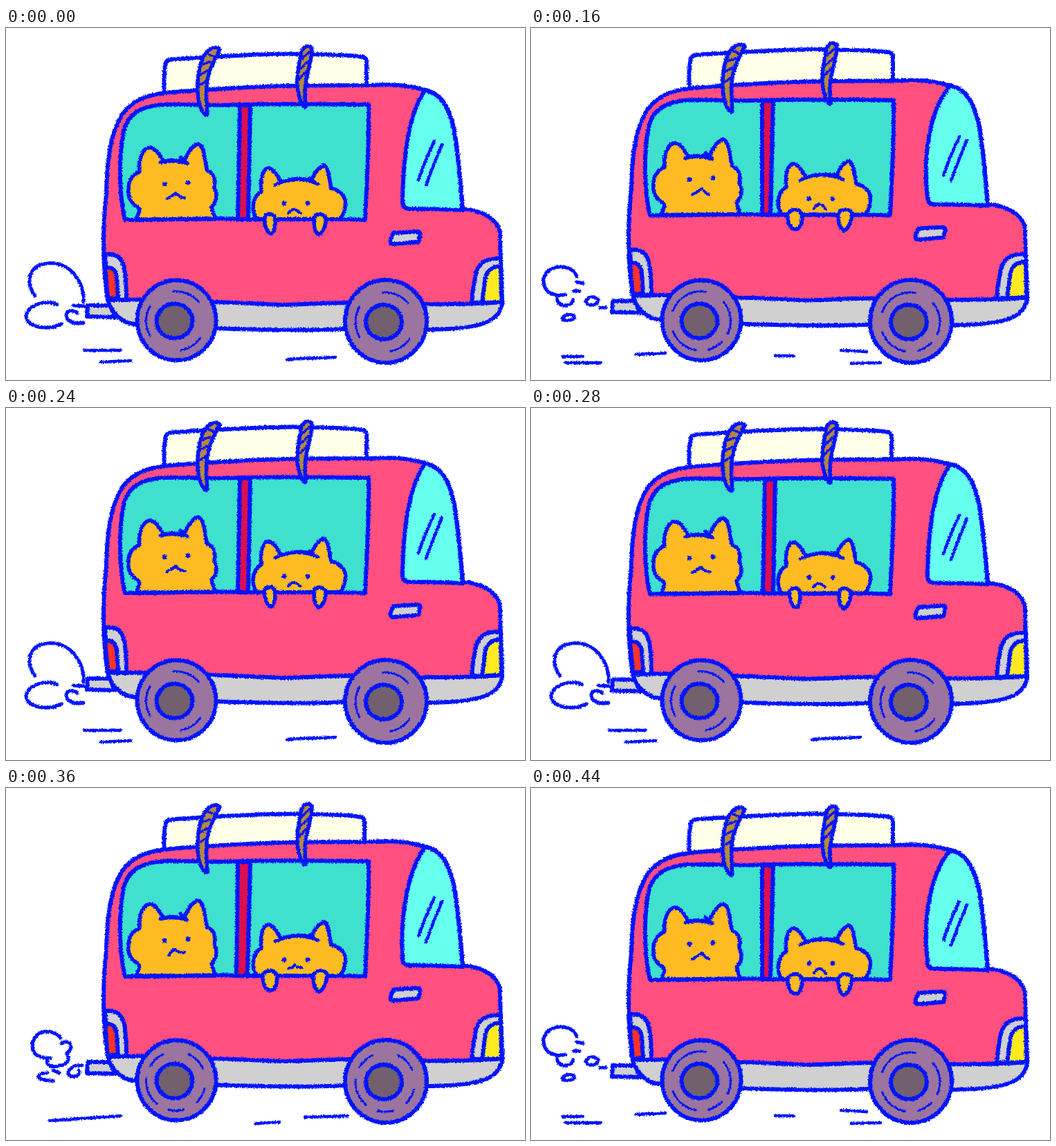
Recreate the animation shown at these times as an HTML page with a canvas. Size 750 by 510 pixels, loop 480 ms.

```html
<!DOCTYPE html>
<html lang="en">
<head>
<meta charset="utf-8">
<title>Bumpy van ride</title>
<style>
  html, body { margin: 0; width: 100%; height: 100%; overflow: hidden; background: #fff; }
  canvas { display: block; width: 750px; height: 510px; filter: url(#crayon); }
  svg { position: absolute; width: 0; height: 0; }
</style>
</head>
<body>
<canvas id="stage" width="750" height="510"></canvas>
<svg aria-hidden="true">
  <filter id="crayon" x="0" y="0" width="100%" height="100%" color-interpolation-filters="sRGB">
    <feTurbulence id="grain" type="fractalNoise" baseFrequency="0.45" numOctaves="2" seed="1" result="noise"/>
    <feDisplacementMap in="SourceGraphic" in2="noise" scale="4" xChannelSelector="R" yChannelSelector="G"/>
  </filter>
</svg>
<script>
const ctx = document.getElementById('stage').getContext('2d');
const grain = document.getElementById('grain');

const STEP = 40, STEPS = 12;
const INK = '#0014ff', PINK = '#ff5080', TEAL = '#3fe0ce', CYAN = '#66ffee', ORANGE = '#ffbb22',
  GRAY = '#d0d0d0', TIRE = '#9b759f', HUB = '#72606f', CREAM = '#ffffe8', ROPE = '#b8893c';

// Vertical bounce per step; the luggage overshoots the van a little.
const vanLift = [0, -1.7, -3.4, -5, -6.5, -8.5, -10, -8.5, -6.6, -5, -3, 0];
const luggageLift = [0, -2, -4, -5, -6.5, -9, -10, -7, -4, 0, 3, 0];

const BODY = 'M147 394C140 350 139 290 145 240C146 190 151 152 168 125C180 108 200 97 230 94' +
  'C270 90 300 89 330 87C400 83 460 83 525 83C570 80 590 86 606 90C627 94 640 112 648 150' +
  'C654 190 657 225 660 262C680 263 708 272 714 296C714 335 717 370 717 400' +
  'C712 424 690 433 640 436C590 439 540 437 490 436C420 439 360 437 300 435' +
  'C240 433 200 433 175 427C160 420 150 407 147 394Z';
const BUMPER_LINE = 'M147 394C200 393 250 393 300 397C340 398 370 400 400 401C440 400 470 398 500 398' +
  'C560 400 660 402 716 397';
const BUMPER = BUMPER_LINE + 'L717 400C712 424 690 433 640 436C590 439 540 437 490 436' +
  'C420 439 360 437 300 435C240 433 200 433 175 427C160 420 150 407 147 394Z';
const WINDOW = 'M172 278C164 245 162 190 170 150C176 124 195 114 225 111C260 110 300 113 340 111' +
  'C400 109 470 111 524 111C525 170 521 230 519 278C460 276 400 278 340 277C300 274 230 279 172 278Z';
const WINDSHIELD_EDGE = 'Q573 262 583 262Q625 262 660 264C657 225 654 190 648 150C640 112 627 94 606 90';

const BIG_CAT = 'M188 277C191 268 195 265 191 260C178 252 176 243 177 233C177 220 184 212 193 208' +
  'C191 192 197 174 208 173C217 174 221 184 228 193Q243 190 257 194C262 182 270 169 278 168' +
  'C288 172 286 192 291 207C302 211 303 220 301 231C307 243 303 254 297 259Q299 268 303 277Z';
const BIG_BROW = 'M223 195Q243 190 261 196M252 187L262 196';
const SMALL_CAT = 'M363 277C354 268 355 244 369 237C367 222 370 204 379 203C388 204 392 216 398 223' +
  'Q420 215 442 221C445 209 453 201 460 199C467 204 467 220 470 232C485 236 493 246 490 259' +
  'Q489 270 482 277Z';
const SMALL_BROW = 'M389 227Q420 212 451 226M439 218L448 225';
const GRIPPING = ['M374 274C372 285 378 297 383 298C389 296 390 280 388 273C384 268 376 268 374 274Z',
  'M446 273C444 285 446 297 452 299C459 296 463 284 462 275C458 269 450 268 446 273Z'];
const ROUND = ['M371 281C369 269 388 265 391 276C393 286 389 299 382 298C376 298 372 291 371 281Z',
  'M444 276C447 267 463 268 464 276C464 285 458 299 452 300C446 297 443 285 444 276Z'];

const LEFT_ROPE = 'M309 31C303 24 288 30 282 50C276 70 275 95 280 112C283 121 289 129 291 125' +
  'C290 110 288 95 291 76C294 56 304 42 309 31Z';
const LEFT_STRIPES = 'M290 37L302 42M283 53L295 49M280 68L291 62M279 83L289 77';
const RIGHT_ROPE = 'M442 29C436 23 426 27 425 45C421 65 419 80 423 97C426 108 430 117 433 114' +
  'C432 100 431 86 434 76C437 56 443 42 442 29Z';
const RIGHT_STRIPES = 'M427 45L439 34M424 60L437 48M422 75L434 63';

const poses = [
  {
    pillar: [338, 353, 335, 350], boxRight: 521,
    windshield: 'M606 90C584 120 574 180 573 252',
    mouths: 'M233 247Q240 243 246 239Q249 245 258 246M408 268Q415 258 425 268',
    paws: GRIPPING,
    ground: 'M113 467L165 467M137 484L180 482M406 480L476 477',
    puff: 'M42 388C28 370 32 343 60 341C95 338 113 370 112 397M74 401C60 393 32 400 29 417' +
      'C30 436 65 438 80 429M112 427C98 430 87 425 87 415C89 408 98 408 103 413M97 402L113 403',
    treads: [[-95, -40], [150, 210], [35, 80]]
  },
  {
    pillar: [335, 353, 333, 349], boxRight: 518,
    windshield: 'M606 90C582 122 569 185 573 252',
    mouths: 'M235 248Q239 240 244 239Q250 244 258 243M408 266Q415 266 417 261Q421 266 427 265',
    paws: ROUND,
    ground: 'M63 482L166 475M361 486L395 484M432 477L494 475',
    puff: 'M79 362C65 346 40 352 38 372C38 388 50 392 64 391M80 370C95 362 98 378 88 384' +
      'M88 386C95 395 85 402 78 402C68 406 56 402 60 393M60 413C45 412 38 424 68 424' +
      'M68 409L77 413M110 402C92 400 85 415 94 418C105 419 108 412 105 409',
    treads: [[-150, -115], [-65, -25], [130, 185], [75, 105], [15, 45]]
  },
  {
    pillar: [334, 350, 334, 346], boxRight: 523,
    windshield: 'M606 90C576 125 566 190 573 252',
    mouths: 'M233 248Q241 244 247 239Q250 244 257 248M409 268Q417 255 426 269',
    paws: ROUND,
    ground: 'M46 476L74 476M49 485L101 485M152 473L194 471M353 475L380 475M448 467L485 469M463 486L505 485',
    puff: 'M66 360C60 341 22 340 18 365C18 385 36 390 50 386M66 368L75 370M62 381L70 381' +
      'M38 392C37 405 58 405 61 394M79 396C82 388 96 388 97 395C95 403 82 403 79 396' +
      'M100 405L108 405M45 421C48 414 62 414 63 419C62 424 49 425 45 421',
    treads: [[-160, -80], [-40, 25], [100, 160], [45, 75]]
  }
];

function shape(path, fill, width = 6) {
  const p = new Path2D(path);
  if (fill) { ctx.fillStyle = fill; ctx.fill(p); }
  if (width) { ctx.lineWidth = width; ctx.stroke(p); }
}

function oval(x, y, rx, ry, fill, width = 6) {
  ctx.beginPath();
  ctx.ellipse(x, y, rx, ry, 0, 0, Math.PI * 2);
  ctx.fillStyle = fill;
  ctx.fill();
  if (width) { ctx.lineWidth = width; ctx.stroke(); }
}

function wheel(x, y, rx, ry, treads) {
  oval(x, y, rx, ry, TIRE);
  oval(x - 3, y + 1, 26, 25, HUB);
  ctx.lineWidth = 3;
  for (const [from, to] of treads) {
    ctx.beginPath();
    ctx.ellipse(x - 1, y + 1, 43, 43, 0, from * Math.PI / 180, to * Math.PI / 180);
    ctx.stroke();
  }
}

function passengers(mouths) {
  shape(BIG_CAT, ORANGE, 5.5);
  shape(BIG_BROW, null, 5);
  shape(SMALL_CAT, ORANGE, 5.5);
  shape(SMALL_BROW, null, 5);
  shape(mouths, null, 4);
  for (const [x, y] of [[229, 226], [263, 224], [402, 254], [436, 254]]) oval(x, y, 3.4, 3.4, INK, 0);
}

function luggage(right) {
  shape(`M229 94Q227 70 231 50Q234 45 245 45C320 40 400 36 440 38Q500 39 ${right - 4} 42` +
    `Q${right + 1} 44 ${right} 55L${right} 92Z`, CREAM);
}

function van(pose) {
  const [tl, tr, bl, br] = pose.pillar;
  shape('M118 402L150 402L158 419L117 418Z', GRAY);
  shape(BODY, PINK, 0);
  shape(BUMPER, GRAY, 0);
  shape(pose.windshield + WINDSHIELD_EDGE, CYAN);
  shape('M619 164Q606 191 596 220M630 169Q618 197 607 228', null, 4.5);
  shape(WINDOW, TEAL, 0);
  passengers(pose.mouths);
  shape(`M${tl} 112L${tr} 112L${br} 277L${bl} 277Z`, '#dc0f4f');
  shape(WINDOW);
  for (const paw of pose.paws) shape(paw, ORANGE, 5.5);
  shape('M560 297L595 295Q600 296 598 302L596 310L560 313Q554 313 556 306Z', GRAY);
  shape('M143 328C162 326 170 335 172 355Q174 370 174 394L147 394Z', GRAY);
  shape('M143 347Q159 345 160 362L162 391L147 392Z', '#ff3328');
  shape('M715 334C692 333 681 341 678 361Q674 380 673 398L716 397Z', GRAY);
  shape('M715 345C699 346 693 354 692 367L688 398L716 397Z', '#ffeb1f');
  shape(BUMPER_LINE);
  shape(BODY);
}

function ropes() {
  shape(LEFT_ROPE, ROPE, 5.5);
  shape(LEFT_STRIPES, null, 3.5);
  shape(RIGHT_ROPE, ROPE, 5.5);
  shape(RIGHT_STRIPES, null, 3.5);
}

function shifted(dy, paint, ...args) {
  ctx.save();
  ctx.translate(0, dy);
  paint(...args);
  ctx.restore();
}

function draw(step) {
  const index = Math.floor(step / 2) % poses.length, pose = poses[index];
  grain.setAttribute('seed', index + 1);

  ctx.fillStyle = '#fff';
  ctx.fillRect(0, 0, 750, 510);
  ctx.strokeStyle = INK;
  ctx.lineCap = ctx.lineJoin = 'round';
  shape(pose.ground, null, 4.5);
  shape(pose.puff, null, 5);
  shifted(luggageLift[step], luggage, pose.boxRight);
  shifted(vanLift[step], van, pose);
  shifted(vanLift[step] * 0.7, ropes);
  wheel(246.5, 423.5, 57, 58, pose.treads);
  wheel(549, 425, 59, 60, pose.treads);
}

let shown = -1;
function tick() {
  const step = Math.floor(performance.now() / STEP) % STEPS;
  if (step !== shown) draw(shown = step);
  requestAnimationFrame(tick);
}
tick();
</script>
</body>
</html>
```
